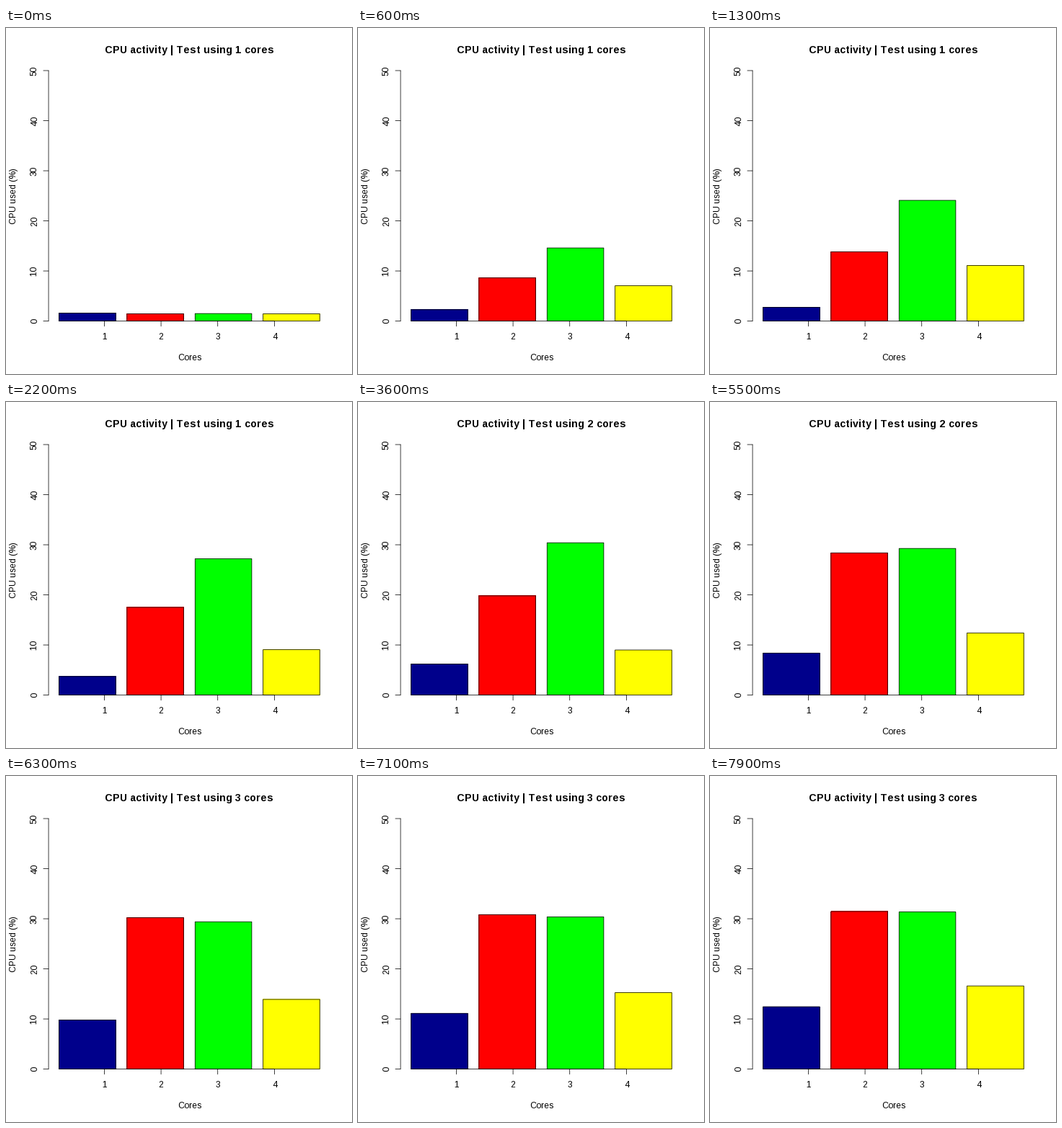
Recreate the animation shown at these times as a matplotlib script. Size 480 px wide and 480 px high, loop 8 s.

```python
import numpy as np
import matplotlib.pyplot as plt
from matplotlib.animation import FuncAnimation
from matplotlib.patches import Rectangle

SIZE, DPI = 480, 100
FRAMES, STEP = 80, 100
PT = 72 / DPI                       # points per pixel
LEFT, RIGHT, TOP, BASE = 59.04, 449.76, 59.04, 406.56
LINE = 14.4                         # height of one margin line
X_UNIT = (RIGHT - LEFT) / 4.968
Y_UNIT = (BASE - TOP) / 50
SWITCH = 3000                       # ms spent on each core count

# CPU % of each core at a few shared times (s)
TIMES = [0, 1.3, 2.2, 3.6, 4.8, 6.3, 7.9]
LOADS = {
    "#00008b": [1.6, 2.75, 3.7, 6.2, 7.15, 9.8, 12.45],
    "#ff0000": [1.45, 13.8, 17.5, 19.8, 26.8, 30.2, 31.45],
    "#00ff00": [1.5, 24.1, 27.2, 30.4, 29.15, 29.4, 31.35],
    "#ffff00": [1.45, 11.1, 9.05, 9, 11.1, 13.9, 16.6],
}


def px(x):
    return LEFT + (x - 0.016) * X_UNIT


def py(y):
    return BASE - y * Y_UNIT


def ease_start(t):
    """Slow the clock towards the first key time, so the start-up rise eases out."""
    end = TIMES[1]
    return t if t >= end else end * (1 - (1 - t / end) ** 1.4)


# Whole-pixel letter spacing without kerning
plt.rcParams.update({"font.family": "Liberation Sans",
                     "text.hinting_factor": 1, "text.kerning_factor": 6})
fig = plt.figure(figsize=(SIZE / DPI, SIZE / DPI), dpi=DPI, facecolor="white")
ax = fig.add_axes([0, 0, 1, 1])
ax.set(xlim=(0, SIZE), ylim=(SIZE, 0))
ax.axis("off")


def label(x, y, text, size=12, **kw):
    return ax.text(x, y, text, fontsize=size * PT, ha="center", va="baseline",
                   rotation_mode="anchor", **kw)


def side_label(line, y, text):
    return label(LEFT + 1 - (line + 0.2) * LINE, y, text, rotation=90)


def stroke(xs, ys):
    ax.plot(xs, ys, color="black", lw=0.75 * PT, snap=False,
            solid_capstyle="round", zorder=3)


def make_bar(k, color):
    """Hard-edged fill with a smooth outline on top."""
    looks = [dict(facecolor=color, lw=0, antialiased=False),
             dict(fill=False, edgecolor="black", lw=0.75 * PT)]
    return [ax.add_patch(Rectangle((px(0.2 + 1.2 * k), BASE), X_UNIT, 0,
                                   snap=False, zorder=2, **look))
            for look in looks]


stroke([LEFT, LEFT], [TOP, BASE])
for v in range(0, 51, 10):
    stroke([LEFT - LINE / 2, LEFT], [py(v)] * 2)
    side_label(1, py(v), str(v))

stroke([px(1), px(4)], [BASE, BASE])
for k in range(1, 5):
    stroke([px(k)] * 2, [BASE, BASE + LINE / 2])
    label(px(k), BASE + 1.8 * LINE, str(k))

mid = (LEFT + RIGHT) / 2
label(mid, BASE + 3.8 * LINE, "Cores")
side_label(3, (TOP + BASE) / 2, "CPU used (%)")
title = label(mid, 34.8, "", LINE, weight="bold")
bars = [make_bar(k, color) for k, color in enumerate(LOADS)]


def update(frame):
    t = frame * STEP
    for bar, loads in zip(bars, LOADS.values()):
        load = np.interp(ease_start(t / 1000), TIMES, loads)
        for part in bar:
            part.set_height(-load * Y_UNIT)
    title.set_text(f"CPU activity | Test using {1 + t // SWITCH} cores")
    return [title]


anim = FuncAnimation(fig, update, frames=FRAMES, interval=STEP,
                     repeat=True, repeat_delay=0, blit=False)
plt.show()
```
